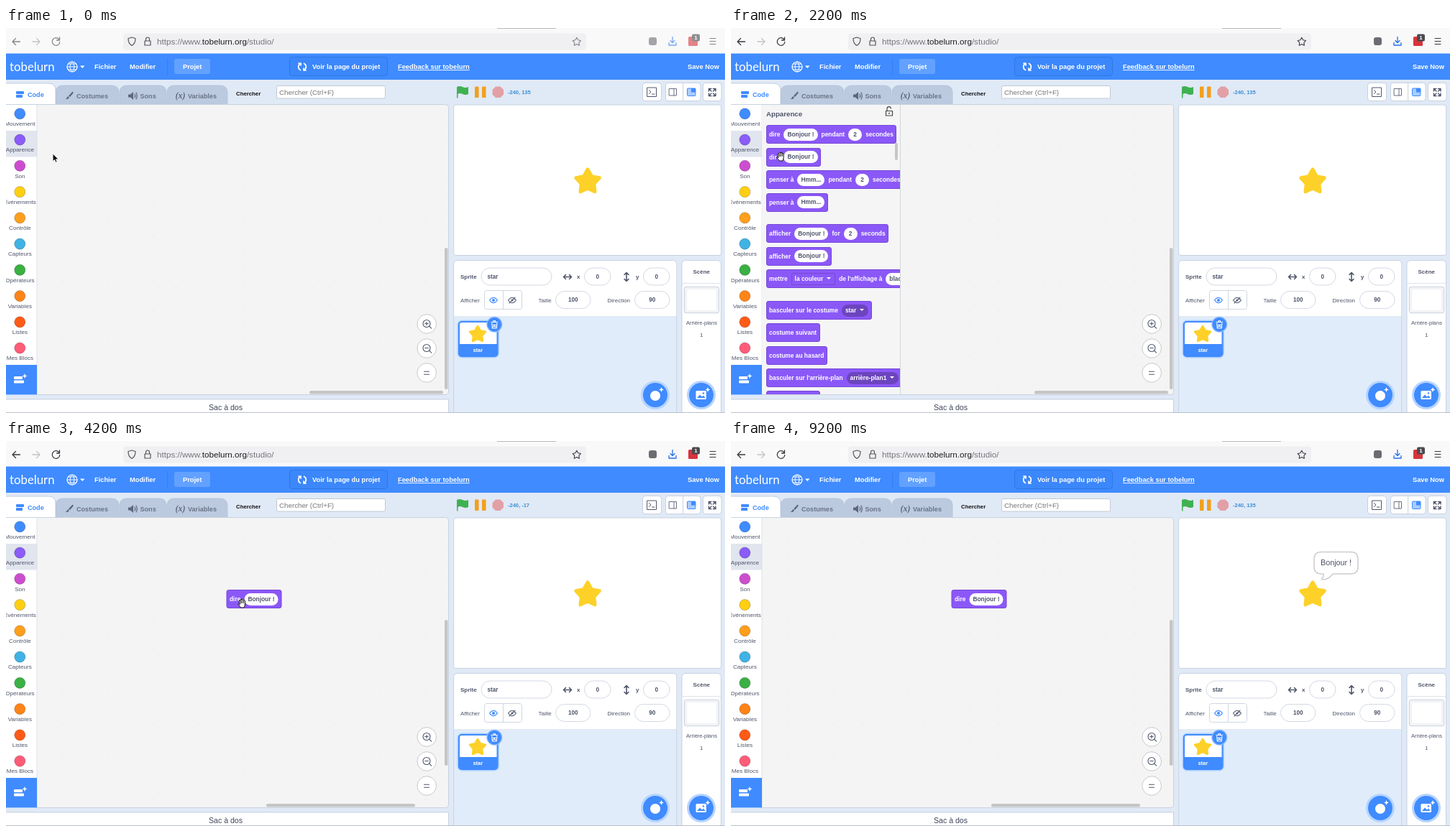
These frames come from a looping animation (1000x536 px, 9400 ms). An HTML page:

```html
<!DOCTYPE html>
<html lang="fr">
<head>
<meta charset="utf-8">
<title>Studio</title>
<style>
html, body { margin: 0; width: 100%; height: 100%; overflow: hidden; background: #e0e9f6; }
svg, #flyout, #drag { position: absolute; left: 0; top: 0; }
svg, .block, #flyout { font-family: "Liberation Sans", Arial, sans-serif; }
#flyout { left: 43px; top: 107px; width: 193px; height: 403px; overflow: hidden; background: #f5f5f6; border-right: 1px solid #cfd3da; box-sizing: border-box; }
#flyout h2 { position: absolute; left: 6px; top: 6px; margin: 0; font-size: 9.7px; line-height: 13px; color: #4f566a; }
.block { position: absolute; display: flex; align-items: center; gap: 5px; height: 26px; padding: 0 3.5px; box-sizing: border-box;
  border: 1px solid #7647d4; border-radius: 3px; background: #8b58f8; color: #fff; font-size: 8.4px; font-weight: bold; white-space: nowrap; }
.block i { font-style: normal; height: 17px; line-height: 17px; min-width: 9px; padding: 0 5px; border-radius: 9px; text-align: center; background: #fff; color: #4f566a; }
.block i.menu { background: #6c45bd; color: #fff; }
.block i.box { background: none; color: #fff; border-radius: 2px; box-shadow: inset 0 0 0 1px #7647d4; }
.block i.menu::after, .block i.box::after { content: ""; display: inline-block; margin: 0 1px 1.5px 5px; border: 3px solid transparent; border-top-color: #fff; border-bottom: 0; }
#thumb { position: absolute; left: 185px; top: 53px; width: 4px; height: 24px; border-radius: 2px; background: #c6c6c6; }
</style>
</head>
<body>
<svg id="page" width="1000" height="536"></svg>
<div id="flyout"></div>
<div id="drag" class="block">dire <i>Bonjour !</i></div>
<svg id="top" width="1000" height="536"></svg>
<script>
const $ = id => document.getElementById(id);
const BLUE = '#3f8bff', INK = '#4f566a', EDGE = '#c8d2e0';

const rect = (x, y, w, h, fill, stroke = 'none', r = 0, more = '') =>
  `<rect x="${x}" y="${y}" width="${w}" height="${h}" rx="${r}" fill="${fill}" stroke="${stroke}" ${more}/>`;
const circle = (x, y, r, fill, stroke = 'none', w = 1) =>
  `<circle cx="${x}" cy="${y}" r="${r}" fill="${fill}" stroke="${stroke}" stroke-width="${w}"/>`;
const stroke = (d, color, w = 1.2, fill = 'none') =>
  `<path d="${d}" fill="${fill}" stroke="${color}" stroke-width="${w}" stroke-linecap="round" stroke-linejoin="round"/>`;
const fill = (d, color) => `<path d="${d}" fill="${color}"/>`;
const text = (x, y, s, size, color, more = '') =>
  `<text x="${x}" y="${y}" font-size="${size}" fill="${color}" ${more}>${s}</text>`;
const BOLD = 'font-weight="bold"', MID = 'text-anchor="middle"';
const bold = (x, y, s, size, color, more = '') => text(x, y, s, size, color, BOLD + ' ' + more);

function starPath(cx, cy, R) {
  let d = '';
  for (let i = 0; i < 10; i++) {
    const r = i % 2 ? R * .54 : R, a = i * Math.PI / 5;
    d += `${i ? 'L' : 'M'}${(cx + r * Math.sin(a)).toFixed(2)} ${(cy - r * Math.cos(a)).toFixed(2)}`;
  }
  return d + 'Z';
}
const star = (cx, cy, R) => stroke(starPath(cx, cy, R), '#fdd128', R * .28, '#fdd128');
const sparkle = (x, y) => fill(`M${x} ${y - 3.5}l1 2.5 2.5 1-2.5 1-1 2.5-1-2.5-2.5-1 2.5-1z`, '#fff');

function browserBar() {
  const dark = '#3a3a40';
  return rect(0, 0, 1000, 36, '#f9f9fa') + rect(683, 0, 82, 1, '#b8b8bc')
    + rect(163, 7.5, 644, 23, '#f0f0f3', 'none', 4)
    + '<g id="nav">'
    + stroke('M9 19h10.5M13.5 14.5L9 19l4.500 4.500M73.500 15.500a5.300 5.300 0 1 0 1.300 4M74.500 13v4h-4', dark, 1.3)
    + stroke('M795 13.500', dark)
    + stroke(starPath(793.8, 19.3, 6), dark, 1.1)
    + rect(894, 13, 11, 11, '#6b6b72', 'none', 3)
    + stroke('M927 12.500v7.500M924 17.500l3 3 3-3M922 20.500v3.500h10v-3.500', '#2470e8', 1.3)
    + rect(949, 12, 13, 13, '#d8343c', 'none', 1.5)
    + rect(954, 8.5, 11, 10, '#4a4a4f', 'none', 2) + bold(959.5, 16.4, '1', 8, '#fff', MID)
    + stroke('M979 14.500h8M979 18.500h8M979 22.500h8', dark, 1.1)
    + '</g>'
    + stroke('M47 19H37M42.500 14.500L47 19l-4.500 4.500', '#c4c4c8', 1.3)
    + stroke('M170 14.500l5-1.500 5 1.500c0 5-1 8-5 10-4-2-5-5-5-10z', '#55555b')
    + stroke('M193 18h8v6h-8zM194.500 18v-2.500a2.500 2.500 0 0 1 5 0V18', '#55555b')
    + text(210, 23, 'https://www.<tspan fill="#1d1d22">tobelurn.org</tspan>/studio/', 11.65, '#75757c');
}

function menuBar() {
  const item = (x, s, more) => bold(x, 57.2, s, 9.3, '#fff', more);
  return rect(0, 35.5, 1000, 36.5, BLUE)
    + text(5, 60, 'tobelurn', 16.8, '#fff', 'font-family="Lato, sans-serif"')
    + stroke('M85 54h14M87 50h10M87 58h10M92 47c-4 4-4 10 0 14M92 47c4 4 4 10 0 14', '#fff', 1)
    + circle(92, 54, 7, 'none', '#fff', 1.2) + fill('M103 52.500h6.500l-3.250 3.500z', '#fff')
    + item(123, 'Fichier') + item(172, 'Modifier')
    + stroke('M224.500 42v24', '#3780ee', 1)
    + rect(234, 43, 50, 21, '#62a1ff', 'none', 3) + item(246, 'Projet')
    + rect(394.5, 40.5, 136, 26, '#3b87fb', '#3078e4', 4)
    + stroke('M409.500 58.500a5 5 0 0 1 0-9M414.500 49.500a5 5 0 0 1 0 9M407 49h3v3M417 59h-3v-3', '#fff', 1.7)
    + item(426, 'Voir la page du projet')
    + item(545, 'Feedback sur tobelurn', 'text-decoration="underline"') + item(948, 'Save Now');
}

function tabs() {
  const shape = (x, y, w, color) =>
    stroke(`M${x} 107V${y + 10}q0-10 10-10h${w - 20}q10 0 10 10V107z`, '#b3c2d6', .8, color);
  const label = (x, s, color = '#6a7386') => bold(x, 97.500, s, 9.1, color);
  return shape(69, 80, 88, '#bccae0') + shape(158, 80, 65, '#bccae0') + shape(224, 80, 84, '#bccae0')
    + shape(-12, 77, 81, '#fff')
    + rect(14, 88, 11, 4, BLUE, 'none', 1) + rect(14, 93, 9, 4, BLUE, 'none', 1) + bold(30, 96, 'Code', 9.1, BLUE)
    + fill('M92.500 88.500l1.500 1.500-5 6-2-1.500zM86 95l2 1.500q-1 3-5.500 2.500 2-1 3.500-4z', '#5d667b') + label(98, 'Costumes')
    + fill('M170 92.500h3l4-3.500v11l-4-3.500h-3z', '#5d667b')
    + stroke('M179 92q1.500 2.500 0 5M181 90q2.500 4.500 0 9', '#5d667b') + label(186.5, 'Sons')
    + text(235.5, 98, '(x)', 12, '#5d667b', 'font-family="Liberation Serif, serif" font-style="italic" font-weight="bold"')
    + label(253, 'Variables')
    + bold(320, 93.6, 'Chercher', 7.8, '#111')
    + rect(376.5, 80.5, 151, 17.5, '#fff', '#c3c9d2', 2) + text(380, 92.7, 'Chercher (Ctrl+F)', 9.75, '#777');
}

function workspace() {
  const cats = [['Mouvement', '#3f8cff'], ['Apparence', '#8b5cf8'], ['Son', '#cc4ecf'], ['Événements', '#ffcf12'], ['Contrôle', '#ff9f1c'],
    ['Capteurs', '#40b2e3'], ['Opérateurs', '#3bb043'], ['Variables', '#ff8417'], ['Listes', '#ff5b17'], ['Mes Blocs', '#ff5c78']];
  const zoom = (y, d) => circle(585.2, y, 13.3, '#fff', '#c9c9cc') + stroke(d, INK, 1.1);
  const lens = y => `M590 ${y}a5 5 0 1 0-10 0a5 5 0 1 0 10 0M588.700 ${y + 3.700}l3 3M582.800 ${y}h4.400`;
  return '<defs><pattern id="dots" x="47.5" y="110.5" width="21" height="21" patternUnits="userSpaceOnUse">'
    + circle(10.5, 10.5, .7, '#e1e1e3') + '</pattern></defs>'
    + rect(-4, 106.5, 619.5, 404, '#f4f4f4', EDGE, 4) + rect(43, 107, 567, 398, 'url(#dots)')
    + rect(0, 107, 43, 404, '#fff') + rect(0, 143, 43, 36.5, '#e1e5ee')
    + stroke('M43 107V511', '#d9dce2', .8)
    + cats.map(([name, color], i) => circle(19.3, 119.3 + i * 36.25, 7.6, color, 'rgba(0,0,0,.22)', .9)
      + text(19.4, 136.2 + i * 36.25, name, 8.1, INK, MID + (i == 1 ? ' id="looks"' : ''))).join('')
    + rect(0, 469, 43, 41.5, BLUE)
    + rect(11, 485, 12, 4, '#fff', 'none', 1) + rect(11, 490.5, 14, 4, '#fff', 'none', 1) + sparkle(26, 484.5)
    + zoom(412, lens(411.5) + 'M585 409.300v4.400') + zoom(446, lens(445.5)) + zoom(480, 'M581.500 478.200h7M581.500 482.200h7')
    + rect(610, 306, 4.5, 197, '#c5c5c7', 'none', 2.2, 'id="vbar"') + rect(422, 505, 186, 4.5, '#c5c5c7', 'none', 2.2, 'id="hbar"')
    + rect(-4, 517, 619.500, 22, '#fff', EDGE) + text(305.5, 531.6, 'Sac à dos', 10.6, '#40465a', MID);
}

function stage() {
  const button = (x, w) => rect(x, 76.5, w, 25, '#fff', EDGE, 3.5);
  return fill('M627 82q4-2 8 0t8 0v10q-4 2-8 0t-6.500 0v5.500h-1.500z', '#40b152')
    + rect(652, 81.500, 5.5, 15.5, '#f2a01c', 'none', 1) + rect(662, 81.500, 5.5, 15.5, '#f2a01c', 'none', 1)
    + fill('M681 81.500h6.500l4.500 4.500v6.500l-4.500 4.500H681l-4.500-4.500V86z', '#e2a0a6')
    + bold(698, 92.2, '', 7.5, '#3a8fd6', 'id="coords"')
    + button(885.5, 26) + stroke('M892 83h12.500v12.500H892zM894.500 86.500l2.500 2.500-2.500 2.500M898.500 92h3.500', INK, 1)
    + button(917.5, 48.5) + stroke('M941.700 77v24.500', EDGE, 1)
    + stroke('M922.500 84.500h10v9.500h-10zM929 84.500v9.500', '#6a7182', 1)
    + rect(947.500, 84, 11.5, 10.5, '#a9ccff', BLUE, 1) + rect(953, 84, 6, 5.5, BLUE)
    + button(969.5, 25.5)
    + stroke('M977.500 88v-3.500h3.500M983.500 84.500h3.500V88M987 91v3.500h-3.500M981 94.500h-3.500V91M978 85l3 3M986.500 85l-3 3M986.500 94l-3-3M978 94l3-3', INK, 1.4)
    + rect(622.7, 107, 372, 209.5, '#fff', EDGE, 3) + star(809, 214, 17.2)
    + '<g id="bubble">'
    + stroke('M821 154.500H862q10 0 10 10V175q0 10-10 10H837c-3 4-8 8-14 8-3-.5-1-2 0-3q2-2 1-5h-3q-10 0-10-10V164.500q0-10 10-10z', '#cdcdd0', 1.5, '#fff')
    + text(820, 172.8, 'Bonjour !', 10.75, '#4b5060') + '</g>';
}

function sprites() {
  const field = (x, y, w, s, left) => rect(x + .5, y + .5, w - 1, 24, '#fff', '#d3d9e2', 12.2)
    + bold(left ? x + 9 : x + w / 2, y + 15.300, s, 8.2, INK, left ? '' : MID);
  const label = (x, y, s, more = '') => text(x, y, s, 8, INK, more);
  const eye = x => `M${x - 5.500} 379q5.500-7.500 11 0q-5.500 7.500-11 0z`;
  const add = x => circle(x, 511, 20, '#b7d4ff') + circle(x, 511, 17, BLUE);
  return rect(622.7, 323.500, 310, 220, '#e0ecfa', EDGE, 5)
    + fill('M623.200 402V329q0-5 5-5h299q5 0 5 5v73z', '#fff') + stroke('M623 401.700h309.500', '#d5deea', .8)
    + label(632, 349, 'Sprite', BOLD) + field(660.5, 333.5, 99, 'star', true)
    + stroke('M776 346.500h10M778.500 343.500l-3 3 3 3M783.500 343.500l3 3-3 3', INK, 1.6) + label(794, 349, 'x', BOLD) + field(804, 333.5, 37.5, '0')
    + stroke('M863 341.500v10M860 343.500l3-3 3 3M860 349.500l3 3 3-3', INK, 1.6) + label(876, 349, 'y', BOLD) + field(886, 333.5, 37.5, '0')
    + label(632, 381.6, 'Afficher') + rect(665.5, 365.5, 52, 26, '#fff', '#d0d7e2', 3) + stroke('M691.500 366v25.500', '#d0d7e2', 1)
    + stroke(eye(678), BLUE) + circle(678, 379, 2, BLUE)
    + stroke(eye(704) + 'M700 383l8-8', '#5f677a', 1.1) + circle(704, 379, 1.6, '#5f677a')
    + label(740.5, 381.6, 'Taille') + field(764, 366, 49.5, '100') + label(836.5, 381.6, 'Direction') + field(874, 366, 49.5, '90')
    + rect(627.5, 406.500, 58.5, 53, '#aecfff', 'none', 7) + rect(630, 409, 53.5, 48, '#fff', BLUE, 4, 'stroke-width="2"')
    + fill('M630 440h53.500v13q0 4-4 4H634q-4 0-4-4z', BLUE) + star(656, 426.5, 11.2) + bold(656.3, 451.2, 'star', 7.5, '#fff', MID)
    + circle(679.3, 412.7, 11, '#8fbcff') + circle(679.3, 412.7, 9.7, BLUE)
    + stroke('M675 409.500h8.500M678 409v-1.500h2.500v1.500M675.800 411l.6 7h5.800l.6-7M677.800 413l3 3M680.800 413l-3 3', '#fff', 1.2)
    + add(903) + circle(903, 512, 7, '#fff') + sparkle(911.5, 503.5)
    + rect(940, 323.500, 54.5, 220, '#fff', EDGE, 5) + label(967.3, 342.2, 'Scène', BOLD + ' ' + MID)
    + stroke('M940.500 355.500h53.500', '#d5deea', .8)
    + rect(943.500, 360.500, 48, 36, '#fff', '#d2d8e2', 3, 'stroke-width="1.6"') + rect(946, 363, 43, 31, '#fff', '#e2e5ea', 2)
    + text(967.5, 413.3, 'Arrière-plans', 7.5, INK, MID) + label(967.3, 429.8, '1', MID)
    + add(967) + rect(959.500, 505, 14.500, 12, '#fff', 'none', 1.5)
    + fill('M961 515l4-4.500 3 3 2-2 2.700 3.500z', BLUE) + circle(970, 508.500, 1.2, BLUE) + sparkle(976, 503.500)
    + rect(0, 535, 1000, 1, '#b9bfc9');
}

$('page').innerHTML = browserBar() + menuBar() + tabs() + workspace() + stage() + sprites();

const hello = '<i>Bonjour !</i>', hmm = '<i>Hmm...</i>', two = '<i>2</i>';
const rows = [[135, `dire ${hello} pendant ${two} secondes`], [166.5, `dire ${hello}`],
  [198, `penser à ${hmm} pendant ${two} secondes`], [229.5, `penser à ${hmm}`],
  [273, `afficher ${hello} for ${two} seconds`], [304.5, `afficher ${hello}`],
  [336, 'mettre <i class="box">la couleur</i> de l\'affichage à <i>black</i>'],
  [380, 'basculer sur le costume <i class="menu">star</i>'], [411, 'costume suivant'], [442.5, 'costume au hasard'],
  [474, 'basculer sur l\'arrière-plan <i class="menu">arrière-plan1</i>'], [505, 'arrière-plan suiv.']];
$('flyout').innerHTML = '<h2>Apparence</h2>'
  + '<svg width="192" height="30">' + stroke('M172.500 8.500h9v6.500h-9zM174 8.500V5.500a2.700 2.700 0 0 1 5.400-.5', '#444', 1.2) + circle(177, 11.7, 1, '#444') + '</svg>'
  + rows.map(([y, s]) => `<div class="block" style="left:5.5px;top:${y - 107}px">${s}</div>`).join('')
  + '<div id="thumb"></div>';

// Cursor shapes, each with its hotspot at 0,0
const shapes = {
  arrow: stroke('M0 0V10.800L2.500 8.600 4.200 12.300 6.200 11.400 4.600 7.900H8z', '#fff', 1, '#111'),
  pointer: stroke('M-1.500 6V-.5q0-1.500 1.300-1.500T1 -.5V3.500q2-.8 2.300.5 1.800-.6 2.200.7 1.700-.2 1.700 1.300 0 3-1.700 5.500H0Q-1.500 8.500-4 6q.3-2 2.500 0z', '#111', 1, '#fff'),
  hand: stroke('M-3 2.500L-4 -2.500q1-1.700 2 0V-4q1-2 2.200 0 1-2 2.200 0v1q1.200-1.300 2 0V2q0 3-1.600 5H-1.500Q-3.500 4-5.500 2q.5-1.700 2.500.5zM-2-2.500l.5 3.500M.2-4v4.500M2.400-3.500v4', '#111', 1, '#fff')
};
$('top').innerHTML = '<g id="cursor"></g>';

const cursorPath = [[0, 65, 175], [200, 65, 175], [1000, 23, 160], [1600, 23, 160], [2400, 84, 184], [2600, 84, 184], [3200, 204, 194],
  [3800, 342, 225], [4200, 328, 225], [5000, 328, 225], [5600, 318, 222], [8200, 318, 222], [9000, 300, -20]];
const blockPath = [[2600, 48.5, 166.5], [3200, 168.5, 176.5], [3800, 306.5, 207]];

function at(path, t) {
  const n = path.findIndex(p => p[0] > t);
  if (n < 0) return path[path.length - 1].slice(1);
  if (!n) return path[0].slice(1);
  const a = path[n - 1], b = path[n], k = (t - a[0]) / (b[0] - a[0]);
  return [a[1] + (b[1] - a[1]) * k, a[2] + (b[2] - a[2]) * k];
}
const show = (id, on) => $(id).style.display = on ? '' : 'none';
const setBar = (id, axis, pos, side, size) => { $(id).setAttribute(axis, pos); $(id).setAttribute(side, size); };

function draw(t) {
  const [x, y] = at(cursorPath, t), [bx, by] = at(blockPath, t);
  const open = t >= 1200 && t < 3800, dragging = t >= 2600 && t < 3800, dropped = t >= 3800;
  const onBlock = (open && x > 49) || (dropped && y > 207);
  const kind = x < 43 ? 'pointer' : onBlock && !dragging ? 'hand' : 'arrow';

  $('cursor').innerHTML = shapes[kind];
  $('cursor').setAttribute('transform', `translate(${x} ${y})`);
  $('nav').setAttribute('opacity', t < 1200 ? .6 : 1);
  $('looks').setAttribute('fill', x < 43 ? BLUE : INK);
  show('flyout', open);
  show('drag', t >= 2600);
  $('drag').style.transform = `translate(${bx}px,${by}px)`;
  $('drag').style.boxShadow = dragging ? '0 0 4px 1px rgba(0,0,0,.5)' : '';
  setBar('vbar', 'y', dropped ? 249 : 306, 'height', dropped ? 203 : 197);
  setBar('hbar', 'x', dropped ? 362 : 422, 'width', dropped ? 207 : 186);
  show('bubble', t >= 6600);
  const stageY = t < 2600 ? 135 : Math.min(135, Math.round((212 - y) / .775));
  $('coords').textContent = `-240, ${stageY}`;
}

const LOOP = 9400, STEP = 200, start = performance.now();
function tick() {
  const t = (performance.now() - start) % LOOP;
  draw(Math.floor(t / STEP) * STEP);
  requestAnimationFrame(tick);
}
tick();
</script>
</body>
</html>
```
